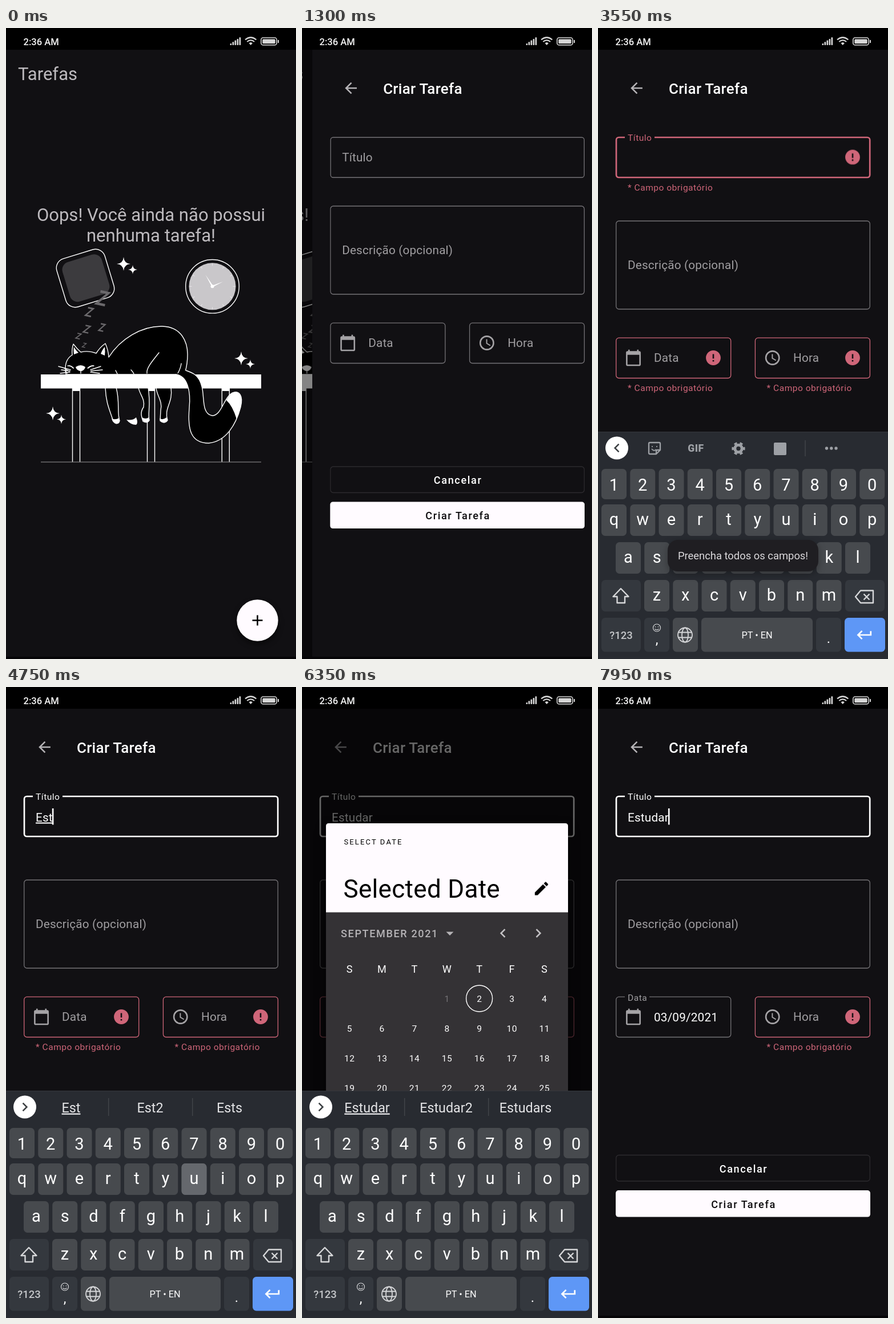
Animation, 508 px wide and 1102 px high, one loop 8000 ms. Source, as an HTML page:

```html
<!DOCTYPE html>
<html lang="pt">
<head>
<meta charset="utf-8">
<title>Tarefas</title>
<style>
html, body { margin: 0; width: 100%; height: 100%; overflow: hidden; background: #111013; }
svg { display: block; width: 100vw; height: 100vh; font-family: Roboto, sans-serif; }
.mid { text-anchor: middle; }
.h5 { font-size: 31.04px; fill: #bdbabe; }
.h6 { font-size: 25.87px; font-weight: 500; letter-spacing: .0125em; fill: #fff; }
.body { font-size: 20.7px; letter-spacing: .009375em; fill: #a09ea1; }
.note { font-size: 15.52px; letter-spacing: .0333em; fill: #cf6679; }
.btn { font-size: 18.1px; font-weight: 500; letter-spacing: .0892em; fill: #fff; }
.line { fill: none; stroke: #757377; stroke-width: 1.3; }
.ink { fill: none; stroke: #fff; stroke-width: 1.4; stroke-linejoin: round; stroke-linecap: round; }
.cat { fill: #000; stroke: #fff; stroke-width: 1.4; stroke-linejoin: round; }
.sug { font-size: 23.3px; fill: #e4e4e6; text-anchor: middle; }
.day { font-size: 15.52px; letter-spacing: .0333em; fill: #fff; text-anchor: middle; }
</style>
</head>
<body>
<svg viewBox="0 0 508 1102" preserveAspectRatio="none">
<defs>
  <path id="back" d="M20 11H7.83l5.59-5.59L12 4l-8 8 8 8 1.41-1.41L7.83 13H20z"/>
  <path id="calendar" d="M20 3h-1V1h-2v2H7V1H5v2H4c-1.1 0-2 .9-2 2v16c0 1.1.9 2 2 2h16c1.1 0 2-.9 2-2V5c0-1.1-.9-2-2-2zm0 18H4V8h16z"/>
  <path id="time" fill-rule="evenodd" d="M2 12a10 10 0 1 0 20 0a10 10 0 1 0-20 0zM4 12a8 8 0 1 0 16 0a8 8 0 1 0-16 0zM12.5 7H11v6l5.25 3.15.75-1.23-4.5-2.67z"/>
  <path id="error" d="M12 2C6.48 2 2 6.48 2 12s4.48 10 10 10 10-4.48 10-10S17.52 2 12 2zm1 15h-2v-2h2zm0-4h-2V7h2z"/>
  <path id="edit" d="M3 17.25V21h3.75L17.81 9.94l-3.75-3.75zM20.71 7.04c.39-.39.39-1.02 0-1.41l-2.34-2.34c-.39-.39-1.02-.39-1.41 0l-1.83 1.83 3.75 3.75z"/>
  <path id="prev" d="M15.41 7.41L14 6l-6 6 6 6 1.41-1.41L10.83 12z"/>
  <path id="next" d="M10 6L8.59 7.41 13.17 12l-4.58 4.59L10 18l6-6z"/>
  <path id="drop" d="M7 10l5 5 5-5z"/>
  <path id="enter" d="M19 7v4H5.83l3.58-3.59L8 6l-6 6 6 6 1.41-1.41L5.83 13H21V7z"/>
  <path id="star" fill="#fff" d="M0-1Q.07-.07 1 0Q.07.07 0 1Q-.07.07-1 0Q-.07-.07 0-1"/>
  <path id="zed" fill="none" stroke="#6b696c" stroke-width=".2" d="M-.35-.5H.5L-.5.5H.4"/>
  <clipPath id="fabClip"><circle cx="440.5" cy="1034.5" r="36.2"/></clipPath>
  <clipPath id="btnClip"><rect x="31" y="879" width="446" height="46.6" rx="5"/></clipPath>
</defs>
<rect width="508" height="1102" fill="#111013"/>

<g id="home">
  <text class="h5" x="21" y="91">Tarefas</text>
  <text class="h5 mid" x="254" y="337">Oops! Você ainda não possui</text>
  <text class="h5 mid" x="254" y="373">nenhuma tarefa!</text>

  <g transform="rotate(-17 139 437)">
    <rect class="ink" x="95" y="393" width="88" height="88" rx="17"/>
    <rect x="104" y="401" width="72" height="72" rx="14" fill="#3c3b3e"/>
  </g>
  <g id="stars"></g>
  <g id="zeds"></g>

  <circle class="ink" cx="361.5" cy="451.3" r="46.8"/>
  <circle cx="361.5" cy="451.3" r="41" fill="#c9c7ca"/>
  <circle cx="361.5" cy="451.3" r="38" fill="none" stroke="#e9e7ea" stroke-width="4" pathLength="120" stroke-dasharray=".5 9.5" stroke-dashoffset=".25"/>
  <path d="M349.5 431l13.4 19.5-2.4 1.5zM380 443l-18 9.6-1-2.6z" fill="#fff"/>
  <circle cx="361.5" cy="451.3" r="3" fill="#fff"/>

  <path d="M61 758H447" stroke="#6d6b6e" stroke-width="1.3"/>
  <g id="legs"></g>

  <path class="cat" d="M174 628C175 655 182 668 187 684Q193 694 199 686C194 670 200 655 193 628"/>
  <path d="M185 682Q192 685 198 681Q202 691 193 691.500Q187 690 185 682" fill="#fff"/>
  <path d="M211 684Q222 686 228 680Q232 690 228 693Q218 693 211 684" fill="#fff"/>
  <path class="cat" d="M232 628C234 640 244 648 241 662C234 672 238 680 240 687Q247 691 251 685C248 672 254 660 249 628"/>
  <path d="M238 680Q245 684 250 680Q254 688 246 689Q239 688 238 680" fill="#fff"/>
  <path class="cat" d="M263 628C264 642 275 652 271 668L270 686Q277 692 283 685C276 664 293 655 289 628"/>
  <path d="M269 682Q276 685 281 680Q286 688 277 689.500Q270 689 269 682" fill="#fff"/>
  <rect x="61" y="605" width="386" height="24.500" fill="#fff"/>
  <path class="cat" d="M105 605C102 588 106 577 116 571Q115 560 118 552Q124 560 131 566Q145 563 158 568Q165 557 174 551Q179 562 180 575C200 543 238 520 274 521C308 522 318 549 318 570Q318 586 314 600L305 605Z"/>
  <path d="M119 570Q118 562 119 557Q123 564 127 567ZM166 569Q169 561 173 557Q174 565 173 572Z" fill="#fff"/>
  <path class="ink" d="M247 603C245 594 258 580 268 567M301 603Q306 594 307 586M219 597Q222 600 224 604M192 598L195 604" stroke-width="1.2"/>
  <path d="M122 592Q131 586 139 592Q138 597 133 599H129Q123 597 122 592" fill="#fff"/>
  <path class="ink" stroke-width="1.2" d="M131 599V603M108 590Q113 589 118 594M143 594Q148 589 154 590" />
  <path class="ink" stroke-width="2.600" d="M110 590Q115 590 118 594M144 594Q148 590 153 590" />
  <path class="ink" stroke-width=".8" d="M113 597L92 591M112 599L97 597M112 601L95 603M148 597L166 591M149 599L169 597M148 601L164 603"/>
  <path d="M102 594L108 598L104 599L107 603" class="ink" stroke-width="1"/>
  <path class="cat" d="M297 605C318 607 324 634 321 664C318 700 323 725 355 725C386 722 403 692 411 662C416 642 409 633 397 637C381 645 378 677 361 677C342 674 348 643 343 626C338 606 327 602 315 598"/>
  <path d="M386 650Q397 660 404 683C410 670 414 655 412 645Q408 632 397 637Q391 641 386 650" fill="#fff"/>

  <g style="filter:drop-shadow(0 5px 5px rgba(0,0,0,.55))"><circle cx="440.5" cy="1034.5" r="36.2" fill="#fffbff"/></g>
  <g clip-path="url(#fabClip)"><circle id="fabRipple" cx="440.5" cy="1034.5" r="10" opacity="0"/></g>
  <path d="M431.500 1034.500h18M440.500 1025.500v18" stroke="#000" stroke-width="2.600"/>
</g>
<rect id="scrim" width="508" height="1102" opacity="0"/>

<g id="form">
  <rect width="508" height="1102" fill="#111013"/>
  <g id="top"></g>
  <text class="h6" x="124" y="115">Criar Tarefa</text>

  <rect id="titleBox" class="line" x="32" y="191" width="444.200" height="70"/>
  <rect id="titleNotch" x="47" y="185" width="52" height="12" fill="#111013"/>
  <text id="titleLabel" class="body">Título</text>
  <g id="typing"></g>
  <g id="titleError"><text class="note" x="52" y="284">* Campo obrigatório</text></g>

  <g id="rest">
    <rect class="line" x="31.700" y="337" width="444.600" height="154" rx="5"/>
    <text class="body" x="52" y="421">Descrição (opcional)</text>
    <rect id="dateBox" class="line" x="31.700" y="541.200" width="201" height="70.300" rx="5"/>
    <rect id="timeBox" class="line" x="275.400" y="541.200" width="201" height="70.300" rx="5"/>
    <g id="fieldIcons"></g>
    <rect id="dateNotch" x="47" y="535" width="43" height="12" fill="#111013"/>
    <text id="dateLabel" class="body">Data</text>
    <text id="dateValue" class="body" x="98" y="584" style="fill:#fff">03/09/2021</text>
    <text class="body" x="342" y="583">Hora</text>
    <g id="dateError"><text class="note" x="52" y="634">* Campo obrigatório</text></g>
    <g id="timeError"><text class="note" x="295.500" y="634">* Campo obrigatório</text></g>
  </g>
  <g id="buttons">
    <rect class="line" x="31.700" y="817.500" width="444.600" height="45.500" rx="5" style="stroke:#2d2b2f"/>
    <text class="btn mid" x="255" y="847.500">Cancelar</text>
    <rect x="31" y="879" width="446" height="46.600" rx="5" fill="#fffbff"/>
    <g clip-path="url(#btnClip)"><circle id="btnRipple" cx="254" cy="902" r="40" opacity="0"/></g>
    <text class="btn mid" x="255" y="909.500" style="fill:#0c0b0d">Criar Tarefa</text>
  </g>
</g>
<rect y="1098" width="508" height="4" fill="#060507"/>
<rect id="dim" width="508" height="1102" opacity="0"/>

<g id="dialog">
  <g style="filter:drop-shadow(0 8px 9px rgba(0,0,0,.5))"><rect x="42" y="238" width="424" height="663" rx="5" fill="#343235"/></g>
  <path d="M42 393.500V243q0-5 5-5H461q5 0 5 5V393.500z" fill="#fffbff"/>
  <text x="73.500" y="275" style="font-size:12.94px;letter-spacing:.1667em">SELECT DATE</text>
  <g style="font-size:43.98px;letter-spacing:.0073em">
    <text id="unpicked" x="72.500" y="368">Selected Date</text>
    <text id="picked" x="72.500" y="368">Sep 3, 2021</text>
  </g>
  <text class="btn" x="68" y="437" style="fill:#b5b3b6">SEPTEMBER 2021</text>
  <g id="days"></g>
  <text class="btn mid" x="314.700" y="874.500">CANCEL</text>
  <text id="ok" class="btn mid" x="414.700" y="874.500">OK</text>
</g>

<g id="keyboard"></g>

<g id="toast">
  <g style="filter:drop-shadow(0 4px 7px rgba(0,0,0,.3))"><rect x="122" y="894" width="264" height="55" rx="18" fill="#1f1e22"/></g>
  <text class="mid" x="254" y="928" style="font-size:18.4px;fill:#dbd9dc">Preencha todos os campos!</text>
</g>

<rect width="508" height="38"/>
<text x="30.500" y="29.500" style="font-size:16.6px;font-weight:500;fill:#f4f4f4">2:36 AM</text>
<g id="bars" fill="#d6d6d6"></g>
<g fill="none" stroke="#d6d6d6" stroke-width="2.200">
  <path d="M419 20.500Q428.700 12.500 438.400 20.500M422.300 24Q428.700 18.800 435.100 24"/>
  <path d="M425.500 26.500Q428.700 23.500 431.900 26.500L428.700 30z" fill="#d6d6d6" stroke="none"/>
  <rect x="446.800" y="17" width="27.400" height="12.800" rx="3.600" stroke-width="1.600"/>
  <rect x="449.300" y="19.500" width="22.400" height="7.800" rx="1.600" fill="#d6d6d6" stroke="none"/>
  <path d="M477 21v5" stroke-width="2"/>
</g>
</svg>

<script>
const LOOP = 8000, DP = 1.2935;
const $ = id => document.getElementById(id);
const add = (id, html) => $(id).insertAdjacentHTML('beforeend', html);
const icon = (id, x, y, fill, k = DP) =>
  `<use href="#${id}" fill="${fill}" transform="translate(${x - 12 * k} ${y - 12 * k}) scale(${k})"/>`;

// Each frame is [ms, properties, easing to the next frame].
function track(id, ...frames) {
  const el = typeof id === 'string' ? $(id) : id;
  const keys = frames.map(([t, props, easing = 'linear']) => ({ offset: t / LOOP, easing, ...props }));
  if (keys[0].offset > 0) keys.unshift({ ...keys[0], offset: 0, easing: 'step-end' });
  const last = keys[keys.length - 1];
  if (last.offset < 1) keys.push({ ...last, offset: 1 });
  el.animate(keys, { duration: LOOP, iterations: Infinity });
}
const steps = (id, ...frames) => track(id, ...frames.map(([t, p]) => [t, p, 'step-end']));
const show = (id, ...spans) =>
  steps(id, [0, { opacity: 0 }], ...spans.flatMap(([a, b]) => [[a, { opacity: 1 }], [b, { opacity: 0 }]]));
const move = (x, y, k = 1) => ({ transform: `translate(${x}px, ${y}px) scale(${k})` });

// Home picture
[[206, 412, 12], [222, 422, 8], [412, 577, 12], [428, 587, 8], [82, 673, 12], [97, 683.5, 8]].forEach(([x, y, r]) =>
  add('stars', `<use href="#star" transform="translate(${x} ${y}) scale(${r})"/>`));
[[169, 472, 17, 22], [146, 496, 11, 14], [168, 523, 9, 12], [141.5, 526, 10, 12], [127, 538, 8, 9], [137, 554, 6, 7]].forEach(([x, y, w, h]) =>
  add('zeds', `<use href="#zed" transform="translate(${x} ${y}) rotate(12) scale(${w} ${h})"/>`));
[116.5, 247.5, 378.3].forEach(x =>
  add('legs', `<path class="ink" d="M${x} 629V757M${x + 13} 629V757"/><rect x="${x}" y="629" width="13" height="5" fill="#fff"/>`));
for (let i = 0; i < 5; i++)
  add('bars', `<rect x="${392.5 + i * 4}" y="${27 - i * 2.7}" width="2.700" height="${3 + i * 2.7}" rx="1"/>`);

// Form icons
add('top', icon('back', 67.5, 105, '#b5b3b6'));
add('fieldIcons', icon('calendar', 62, 576, '#a5a3a6') + icon('time', 305.7, 576, '#a5a3a6'));
add('titleError', icon('error', 446, 225.5, '#cf6679'));
add('dateError', icon('error', 202, 576, '#cf6679'));
add('timeError', icon('error', 446, 576, '#cf6679'));
$('titleBox').setAttribute('rx', 4.5);

// Calendar: the first of the month falls on column 3
const col = c => 83 + c * 56.9, row = r => 544.3 + r * 51.85;
add('days', icon('drop', 259, 430, '#b5b3b6') + icon('prev', 352, 430, '#c4c2c5') + icon('next', 414, 430, '#c4c2c5')
  + icon('edit', 419.5, 352, '#000')
  + [...'SMTWTFS'].map((d, i) => `<text class="mid" x="${col(i)}" y="499" fill="#fff" font-size="18.1">${d}</text>`).join('')
  + `<circle class="ink" cx="${col(4)}" cy="544" r="23"/>`
  + `<circle id="pick" cx="${col(5)}" cy="544" r="23.500" fill="#fff"/>`);
for (let d = 1; d <= 30; d++) {
  const n = d + 2;
  add('days', `<text id="day${d}" class="day" x="${col(n % 7) + .3}" y="${row(n / 7 | 0) + 5.7}">${d}</text>`);
}
$('day1').style.fill = '#757376';

// Keyboard
const KEY = '#474a4e', DARK = '#34383e', spots = {};
const cap = (x, y, w, h, fill) => `<rect x="${x}" y="${y}" width="${w}" height="${h}" rx="6.500" fill="${fill}"/>`;
const glyph = (x, y, s, size = 29) => `<text class="mid" x="${x}" y="${y}" fill="#fff" font-size="${size}">${s}</text>`;
const rows = [['1234567890', 6, 770, 53, 808], ['qwertyuiop', 6, 832, 55, 868], ['asdfghjkl', 31, 898, 55, 934], ['zxcvbnm', 81, 964, 55, 1000]];
let caps = '', digits = '', lower = '', upper = '';
rows.forEach(([chars, x0, y, h, base], r) => [...chars].forEach((c, i) => {
  const x = x0 + i * 50.25;
  spots[c] = [x, y, 44, h];
  caps += cap(x, y, 44, h, KEY);
  if (!r) digits += glyph(x + 22, base, c);
  else {
    lower += glyph(x + 22, base, c);
    upper += glyph(x + 22, base, c.toUpperCase());
  }
}));
const arrow = 'M40 979L53.500 993H47V1004H33.500V993H26.500Z';
add('keyboard', `<rect y="705" width="508" height="397" fill="#282b31"/><path d="M0 705.500H508" stroke="#34373c"/>`
  + caps + cap(6, 964, 69, 55, DARK) + cap(433, 964, 69, 55, DARK)
  + cap(6, 1030, 69, 59.5, DARK) + cap(81, 1030, 44, 59.5, DARK) + cap(131, 1030, 44, 59.5, KEY)
  + cap(181, 1030, 195, 59.5, KEY) + cap(382, 1030, 44, 59.5, DARK) + cap(432, 1030, 71, 59.5, '#5e97f6')
  + '<g id="flashes"></g>' + digits + `<g id="lower">${lower}</g><g id="upper">${upper}</g>`
  + `<g fill="none" stroke="#d6d7d9" stroke-width="2.400" stroke-linejoin="round">
      <path d="${arrow}"/><path id="shift" d="${arrow}" fill="#d6d7d9"/>
      <path d="M460 982.500H482V1004H460L451 993.200ZM465.500 988.500l10 10m0-10l-10 10"/>
      <g stroke-width="1.800"><circle cx="152.500" cy="1060" r="12.500"/><ellipse cx="152.500" cy="1060" rx="5.500" ry="12.500"/><path d="M141 1055.500h23M141 1064.500h23"/></g>
      <g stroke-width="1.200"><circle cx="103" cy="1047.500" r="6.500"/><path d="M99.500 1049.500q3.500 3.500 7 0M100.500 1045v1.500M105.500 1045v1.500"/></g>
    </g>`
  + '<text class="mid" x="40.500" y="1066.500" font-size="18.500" font-weight="500" fill="#c4c6c9">?123</text>'
  + glyph(103, 1076, ',', 24) + glyph(404, 1074, '.', 24) + glyph(278.5, 1065.5, 'PT • EN', 16.3)
  + icon('enter', 467, 1060, '#fff', 1.35)
  + '<circle cx="33" cy="733.500" r="20" fill="#fff"/>'
  + `<g id="tools" fill="#9da0a5">${icon('prev', 33, 733.5, '#3c4043')}
      <g fill="none" stroke="#9da0a5" stroke-width="2.300" stroke-linejoin="round"><path d="M91 724H107Q109 724 109 726V737L102 744H91Q89 744 89 742V726Q89 724 91 724ZM109 737H104Q102 737 102 739V744"/><path d="M94 735q4 5 8 1M95 730v2M103 730v2" stroke-width="1.800"/></g>
      <text class="mid" x="171.500" y="739.500" font-size="17.500" font-weight="900" letter-spacing=".5">GIF</text>
      <g fill="none" stroke="#9da0a5"><circle cx="246" cy="734.500" r="6.200" stroke-width="5"/><circle cx="246" cy="734.500" r="9.800" stroke-width="3.600" pathLength="120" stroke-dasharray="10" stroke-dashoffset="5"/></g>
      <rect x="308" y="724" width="22" height="22" rx="2"/>
      <path d="M363 720V748" stroke="#44474c" stroke-width="1.300"/>
      <circle cx="400.500" cy="734" r="2.700"/><circle cx="408.800" cy="734" r="2.700"/><circle cx="417" cy="734" r="2.700"/></g>`
  + `<g id="words">${icon('next', 33, 733.5, '#3c4043')}<path d="M179.700 718V749M326.700 718V749" stroke="#44474c" stroke-width="1.300"/></g>`);

// Typing
const WORD = 'Estudar', times = [4200, 4400, 4600, 4800, 5100, 5300, 5600], DONE = 6350;
const typed = n => `<text id="typed${n}" class="body" x="52" y="234.500" style="fill:#fff" text-decoration="underline">${WORD.slice(0, n)}</text>`;
times.forEach((t, i) => {
  const n = i + 1, s = WORD.slice(0, n), end = times[n];
  add('typing', typed(n));
  add('words', `<g id="sug${n}" class="sug"><text x="114" y="742.500" text-decoration="underline">${s}</text><text x="252.500" y="742.500">${s}2</text><text x="391.500" y="742.500">${s}s</text></g>`);
  add('flashes', `<g id="flash${n}">${cap(...spots[WORD[i].toLowerCase()], '#65686d')}</g>`);
  show('typed' + n, [t, end || DONE]);
  show('sug' + n, [t, end || LOOP]);
  show('flash' + n, [t - 50, t + 50]);
});
add('typing', `<text id="final" class="body" x="52" y="234.500" style="fill:#fff">${WORD}</text>
  <rect id="cursor" x="51" y="212" width="2.600" height="28.500" fill="#fff"/>`);
show('final', [DONE, LOOP]);
show('cursor', [3150, 3500], [4200, 6100], [6400, LOOP]);
const width = n => $('final').getSubStringLength(0, n);
const caret = document.getElementById('cursor');
steps(caret, [0, move(0, 0)], ...times.map((t, i) => [t, move(width(i + 1), 0)]));

// Home to form
const GLIDE = 'cubic-bezier(.2,.6,.2,1)';
track('form', [850, move(508, 0)], [900, move(414, 0), GLIDE], [1550, move(0, 0)]);
track('home', [850, move(0, 0)], [900, move(-23.3, 0), GLIDE], [1550, move(-127, 0)]);
track('scrim', [850, { opacity: 0 }], [900, { opacity: .1 }, GLIDE], [1550, { opacity: .5 }]);
track('fabRipple', [150, { opacity: 0, r: '8px' }], [250, { opacity: .18, r: '22px' }], [450, { opacity: .18, r: '37px' }], [800, { opacity: 0, r: '37px' }]);
track('btnRipple', [1850, { opacity: 0, r: '30px' }], [1900, { opacity: .2, r: '90px' }], [2050, { opacity: .21, r: '300px' }], [2150, { opacity: .21, r: '300px' }], [2450, { opacity: 0, r: '300px' }]);

// Validation
const GREY = '#757377', RED = '#cf6679';
steps('rest', [0, move(0, -26)], [1950, move(0, 0)]);
steps('buttons', [0, move(0, -51.5)], [1950, move(0, 0)]);
const fade = (id, off) => track(id, [1950, { opacity: 0 }], [2050, { opacity: 1 }], [off - 1, { opacity: 1 }], [off, { opacity: 0 }]);
fade('titleError', 4200);
fade('dateError', 7550);
track('timeError', [1950, { opacity: 0 }], [2050, { opacity: 1 }]);
steps('titleBox', [0, { stroke: GREY, strokeWidth: '1.3px' }], [1950, { stroke: RED, strokeWidth: '1.3px' }],
  [3050, { stroke: RED, strokeWidth: '2.7px' }], [4200, { stroke: '#fff', strokeWidth: '2.7px' }]);
steps('dateBox', [0, { stroke: GREY }], [1950, { stroke: RED }], [7550, { stroke: GREY }]);
steps('timeBox', [0, { stroke: GREY }], [1950, { stroke: RED }]);
track('toast', [2000, { opacity: 0, ...toastAt(8, .92) }], [2100, { opacity: 1, ...toastAt(4, .962) }, 'ease-out'],
  [2400, { opacity: 1, ...toastAt(0, 1) }], [3600, { opacity: 1, ...toastAt(0, 1) }], [3800, { opacity: 0, ...toastAt(0, .97) }]);
function toastAt(dy, k) { return move(254 * (1 - k), 921.5 * (1 - k) + dy, k); }

// Floating labels
const big = { fontSize: '20.7px', letterSpacing: '.2px' }, small = { fontSize: '15.52px', letterSpacing: '.52px' };
const lift = (id, t, x, y, top) => track(id, [t, { ...big, ...move(x, y) }, 'ease-in-out'], [t + 170, { ...small, ...move(52, top) }]);
lift('titleLabel', 3050, 52, 233, 197);
lift('dateLabel', 7550, 98, 583, 547.5);
steps('titleLabel', [0, { fill: '#a09ea1' }], [3050, { fill: RED }], [4200, { fill: '#fff' }]);
show('titleNotch', [3150, LOOP]);
show('dateNotch', [7650, LOOP]);
show('dateValue', [7550, LOOP]);

// Keyboard states
track('keyboard', [3100, move(0, 400), 'cubic-bezier(.1,.7,.2,1)'], [3400, move(0, 0)], [6400, move(0, 0), 'ease-in'], [6650, move(0, 400)]);
show('lower', [0, 3950], [4250, LOOP]);
show('upper', [3950, 4250]);
show('shift', [3950, 4250]);
show('tools', [0, 4200]);
show('words', [4200, LOOP]);

// Date dialog
track('dim', [6200, { opacity: 0 }], [6350, { opacity: .6 }], [7550, { opacity: .6 }], [7800, { opacity: 0 }]);
$('dialog').style.transformOrigin = '254px 570px';
track('dialog', [6200, { opacity: 0, transform: 'scale(.92)' }, 'ease-out'], [6350, { opacity: 1, transform: 'scale(1)' }],
  [7550, { opacity: 1, transform: 'scale(1)' }], [7700, { opacity: 0, transform: 'scale(.97)' }]);
show('unpicked', [0, 7150]);
show('picked', [7150, LOOP]);
show('pick', [7150, LOOP]);
steps('day3', [0, { fill: '#fff' }], [7150, { fill: '#000' }]);
steps('ok', [0, { opacity: .38 }], [7150, { opacity: 1 }]);
</script>
</body>
</html>
```
